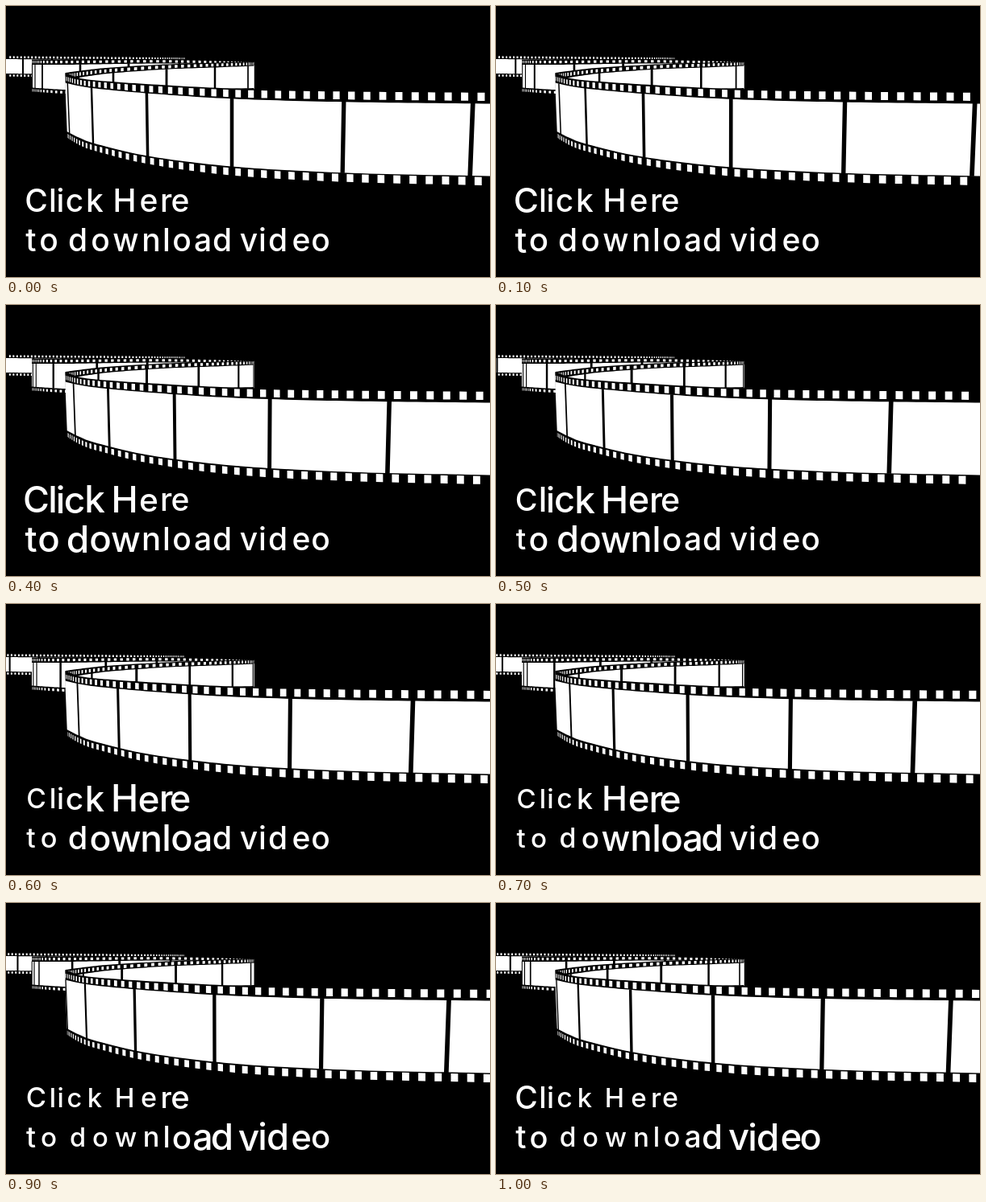
These frames come from a looping animation (600x337 px, 1100 ms). An HTML page:

```html
<!DOCTYPE html>
<html lang="en">
<head>
<meta charset="utf-8">
<title>Film strip</title>
<style>
  html, body { margin: 0; width: 100%; height: 100%; overflow: hidden; background: #000; }
  svg { display: block; width: 100vw; height: 100vh; }
  text { font: 500 39px Inter, "Open Sans", sans-serif; fill: #fff; text-anchor: middle; }
</style>
</head>
<body>
<svg viewBox="0 0 600 337" preserveAspectRatio="none">
  <rect width="600" height="337"/>
  <g id="film"></g>
  <g id="words"></g>
</svg>
<script>
const STEP = 100, STEPS = 11, HOLES = 8;
const clamp = (v, lo, hi) => Math.min(hi, Math.max(lo, v));

function add(parent, tag, attrs) {
  const node = document.createElementNS("http://www.w3.org/2000/svg", tag);
  for (const key in attrs) node.setAttribute(key, attrs[key]);
  return parent.appendChild(node);
}

// Smooth Hermite curve through the points (xs[i], ys[i]).
function curve(xs, ys) {
  const last = xs.length - 1;
  const slope = i => {
    const a = Math.max(0, i - 1), b = Math.min(last, i + 1);
    return (ys[b] - ys[a]) / (xs[b] - xs[a]);
  };
  return x => {
    x = clamp(x, xs[0], xs[last]);
    let i = 0;
    while (i < last - 1 && x > xs[i + 1]) i++;
    const h = xs[i + 1] - xs[i], t = (x - xs[i]) / h, s = 1 - t;
    return s * s * (1 + 2 * t) * ys[i] + t * t * (3 - 2 * t) * ys[i + 1]
      + h * t * s * (s * slope(i) - t * slope(i + 1));
  };
}

const polygon = pts =>
  "M" + pts.map(p => p[0].toFixed(2) + " " + p[1].toFixed(2)).join("L") + "Z";

// Each strip: its extent, the course of its frame lines, and its edges from top to bottom.
const strips = [
  {
    from: 0, to: 222, first: -2, course: [-51, -15, 21, 57, 93, 129, 164, 193, 212, 222],
    at: [0, 222], outer: [61, 63], topHoles: [63.6, 65.4], faceTop: [66, 68],
    faceBottom: [84, 86], lowHoles: [86.4, 89], outerLow: [89, 91], hole: [2.6, 2.4]
  },
  {
    from: 32, to: 308, first: -3, course: [31.5, 32.5, 36, 45, 92, 152, 215, 268, 299, 309],
    at: [32, 73, 200, 308], outer: [66.5, 66.5, 66, 68.5], topHoles: [69.7, 69.6, 68.8, 71],
    faceTop: [73, 73, 71.5, 73.5], faceBottom: [101.5, 104, 106, 106],
    lowHoles: [104.8, 107.3, 109, 109], outerLow: [107.5, 110, 112, 112], hole: [3.2, 3.2, 3, 3]
  },
  {
    from: 74, to: 307.5, first: -2, course: [309, 308, 300, 259, 199, 133, 90, 74],
    at: [74, 100, 130, 200, 260, 308], outer: [83, 79.5, 76.5, 72.5, 70.5, 69],
    topHoles: [87, 83.5, 80.2, 75.6, 73.4, 71.8], faceTop: [92, 87.5, 83.7, 78.7, 76.4, 74.6],
    faceBottom: [103, 103, 103, 103, 103, 102], lowHoles: [106, 106, 106, 106, 106, 106],
    outerLow: [108, 108, 108, 108, 108, 108], hole: [4.4, 4.2, 4, 3.7, 3.5, 3.4], faceOnly: true
  },
  {
    from: 74.5, to: 604, first: -2, course: [73.5, 77.5, 107, 175, 280, 418, 577, 742, 905],
    at: [74, 90, 107, 175, 280, 418, 600], outer: [83, 89, 92, 97, 102.5, 105, 107],
    topHoles: [90, 94.5, 97, 103, 108.7, 111.3, 113], faceTop: [95.5, 99, 102, 108.5, 115.3, 119.3, 121.5],
    faceBottom: [156, 164, 170.5, 186.5, 199.5, 207.3, 211.5], lowHoles: [161, 170, 176.3, 192.3, 206, 213.7, 218],
    outerLow: [166, 176, 183, 198.5, 212.5, 220.5, 225], hole: [5, 6, 6.6, 8, 9.2, 9.8, 10.2], skew: 0.006
  }
];

const film = document.getElementById("film");
for (const strip of strips) {
  for (const edge of ["outer", "topHoles", "faceTop", "faceBottom", "lowHoles", "outerLow", "hole"])
    strip[edge] = curve(strip.at, strip[edge]);
  const { from, to, course, first } = strip;
  strip.last = first + course.length - 1;
  strip.x = curve(course.map((_, i) => i + first), course);
  strip.tilt = (x, side) => x + side * (280 - x) * (strip.skew || 0);

  const band = (upper, lower) => {
    const top = [], low = [];
    for (let i = 0; i <= 64; i++) {
      const x = from + (to - from) * (i / 64) ** 1.5;
      top.push([strip.tilt(x, -1), upper(x)]);
      low.unshift([strip.tilt(x, 1), lower(x)]);
    }
    return polygon(top.concat(low));
  };
  add(film, "path", { d: band(strip.outer, strip.outerLow) });
  add(film, "path", { d: band(strip.faceTop, strip.faceBottom), fill: "#fff" });
  strip.lines = add(film, "path", {});
  strip.holes = add(film, "path", { fill: "#fff" });
}

function drawStrip(strip, shift) {
  const { from, to, first, last, x, tilt } = strip;
  const visible = v => v > from && v < to;
  let lines = "", holes = "";
  for (let k = first - 1; k < last; k++) {
    const u = k + shift;
    const mid = x(u);
    if (u >= first && visible(mid)) {
      const pace = Math.abs(x(u + 0.1) - x(u - 0.1)) * 5;
      const half = 0.5 + pace * 0.0145;
      const top = strip.faceTop(mid) - 0.5, low = strip.faceBottom(mid) + 0.5;
      const a = tilt(mid, -1), b = tilt(mid, 1);
      lines += polygon([[a - half, top], [a + half, top], [b + half, low], [b - half, low]]);
    }
    for (let j = 0; j < HOLES; j++) {
      const c = u + (j + 0.5) / HOLES, w = 0.22 / HOLES;
      const ends = [x(c - w), x(c + w)];
      if (c < first || c > last || !ends.every(visible)) continue;
      for (const [row, side] of [[strip.topHoles, -1], [strip.lowHoles, 1]]) {
        if (strip.faceOnly && side > 0) continue;
        const corner = (v, dir) => [tilt(v, side), row(v) + dir * strip.hole(v) / 2];
        holes += polygon([corner(ends[0], -1), corner(ends[1], -1), corner(ends[1], 1), corner(ends[0], 1)]);
      }
    }
  }
  strip.lines.setAttribute("d", lines);
  strip.holes.setAttribute("d", holes);
}

// Letters keep their centres while a wave of growing and shrinking passes over them.
const words = document.getElementById("words");
const letters = [];
function addLine(string, centres, baseline) {
  [...string.replace(/ /g, "")].forEach((char, i) => {
    const node = add(words, "text", { y: 14 });
    node.textContent = char;
    letters.push({ node, x: centres[i], y: baseline - 14 });
  });
}
addLine("Click Here", [37.5, 58, 67.5, 85, 110, 147, 177, 198.5, 216], 256);
addLine("to download video",
  [31, 53, 89, 117, 148.5, 180, 199, 218, 244, 268, 301, 318, 337, 366, 390], 305);

const swell = curve([0.4, 1.5, 4, 5.4, 6.6, 8.6, 9.8], [1, 1.15, 1.15, 0.9, 0.85, 0.85, 1]);

function draw(time) {
  const step = Math.floor(time / STEP) % STEPS;
  for (const strip of strips) drawStrip(strip, step / STEPS);
  for (const { node, x, y } of letters) {
    const size = swell(step - (x - 37) / 42);
    node.setAttribute("transform", `translate(${x} ${y}) scale(${size.toFixed(3)})`);
  }
}

const start = performance.now();
function tick() {
  draw(performance.now() - start);
  requestAnimationFrame(tick);
}
tick();
</script>
</body>
</html>
```
